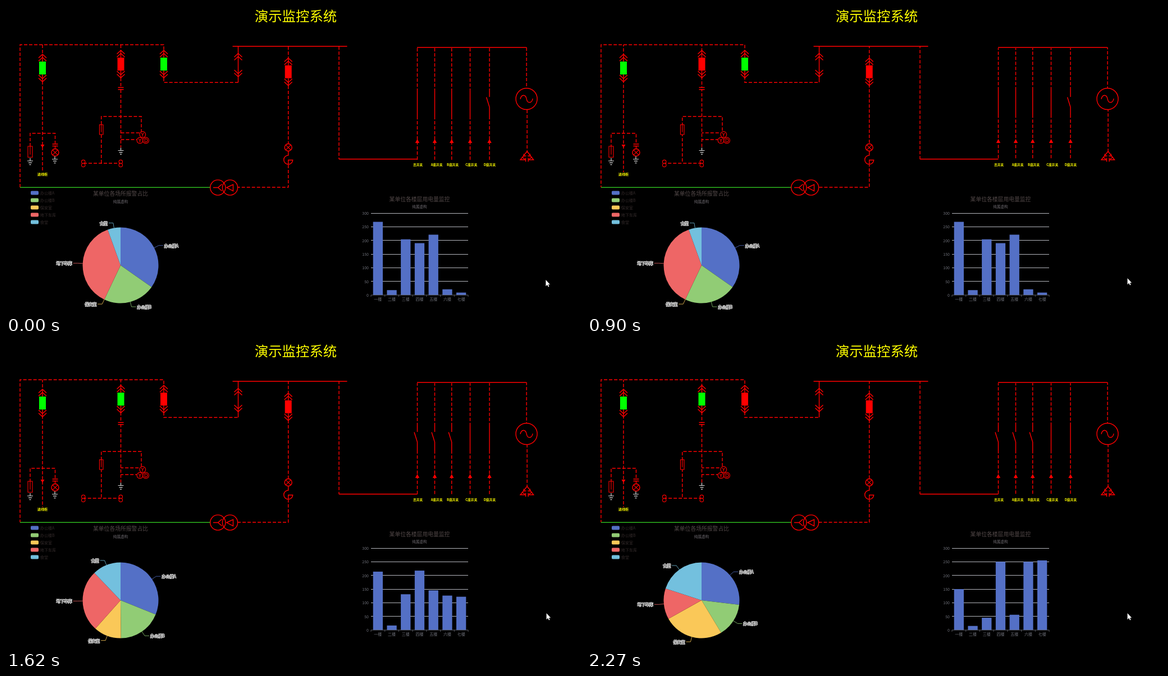
Animation of 1024 by 547 pixels, one loop 2340 ms. Source, as an HTML page:

```html
<!DOCTYPE html>
<html>
<head>
<meta charset="utf-8">
<style>
html, body { margin: 0; width: 100%; height: 100%; overflow: hidden; background: #000; }
svg { display: block; width: 100vw; height: 100vh; }
text { font-family: "Noto Sans CJK SC", "Noto Sans CJK", "Noto Sans", sans-serif; dominant-baseline: central; }
.wire, .flow { fill: none; stroke: #f00; stroke-width: 1.4; }
.flow { stroke-dasharray: 6 3; }
.thin { stroke-width: 1.1; }
.solid { fill: #f00; }
.earth { fill: none; stroke: #ddd; stroke-width: 1.2; }
.mid { text-anchor: middle; }
.end { text-anchor: end; }
.bold { text-anchor: middle; font-weight: 700; }
.tag { font-size: 7px; fill: #333; stroke: #eee; stroke-width: 1.4px; paint-order: stroke; }
</style>
</head>
<body>
<svg id="stage" viewBox="0 0 1024 547"></svg>
<script>
const LOOP = 2340, SWITCH_AT = 1378, EASE_TIME = 500, FLOW_CYCLES = 7, DASH = 9;
const COLORS = ['#5470c6', '#91cc75', '#fac858', '#ee6666', '#73c0de'];
const PLACES = ['办公楼A', '办公楼B', '保安室', '地下车库', '食堂'];
const SLICE_ENDS = [[125, 205.4, 205.4, 340.2, 360], [96.8, 148.9, 240.8, 288.2, 360]];
const BARS = [[268, 18, 204, 190, 221, 21, 9], [150, 15, 45, 250, 56, 250, 255]];
const stage = document.getElementById('stage');

function add(tag, attrs, content) {
  const el = document.createElementNS('http://www.w3.org/2000/svg', tag);
  for (const key in attrs) el.setAttribute(key, attrs[key]);
  if (content !== undefined) el.textContent = content;
  stage.appendChild(el);
  return el;
}
const path = (d, cls = 'wire') => add('path', { d, class: cls });
const flow = d => path(d, 'flow');
const circle = (cx, cy, r, cls = 'wire') => add('circle', { cx, cy, r, class: cls });
const box = (x, y, width, height, fill) => add('rect', { x, y, width, height, fill });
const label = (s, x, y, size, fill, cls = 'mid') =>
  add('text', { x, y, 'font-size': size, fill, class: cls }, s);

function chevrons(x, y, dir) {
  for (const dy of [0, 5.5]) {
    const top = y + dir * dy;
    path(`M${x - 7} ${top + dir * 6.5}L${x} ${top}L${x + 7} ${top + dir * 6.5}`);
  }
}
function breaker(x, y, fill) {
  chevrons(x, y, 1);
  chevrons(x, y + 49, -1);
  path(`M${x} ${y}V${y + 13}M${x} ${y + 36}V${y + 49}`);
  return box(x - 6, y + 13, 12, 23, fill);
}
function earth(x, y) {
  path(`M${x} ${y - 5}V${y}M${x - 5} ${y}h10M${x - 3} ${y + 3.3}h6M${x - 1.5} ${y + 6.6}h3`, 'earth');
}
function lamp(x, y) {
  const d = 4.6;
  circle(x, y, 6.5);
  path(`M${x - d} ${y - d}l${2 * d} ${2 * d}M${x + d} ${y - d}l${-2 * d} ${2 * d}`, 'wire thin');
}
function capacitor(x, y) {
  path(`M${x - 5} ${y}h10M${x - 5} ${y + 3.5}h10`);
}
function resistor(x, y, w, h) {
  path(`M${x - w / 2} ${y}h${w}v${h}h${-w}zM${x} ${y}v${h * 0.75}`, 'wire thin');
}
function star(x, y) {
  path(`M${x - 2.5} ${y - 3}L${x} ${y}L${x + 2.5} ${y - 3}M${x} ${y}v3.5`, 'wire thin');
}

label('演示监控系统', 516, 16.7, 24.4, '#ff0');

// Incoming cabinet
flow('M25 323V69H281V79');
flow('M65 69V86');
flow('M65 134V296');
breaker(65, 86, '#0f0');
flow('M43 250V226.7H87.5V245');
path('M61.5 247h7l-3.5 5.5z', 'solid');
resistor(43, 250, 8, 19.5);
earth(43, 276);
capacitor(87.5, 246);
path('M87.5 249.5V254.5');
lamp(87.5, 261);
earth(87, 273);
label('进线柜', 65, 299, 6.2, '#ff0', 'bold');

// Metering branch
flow('M204.5 69V79');
const breakerB = breaker(204.5, 79, '#f00');
flow('M204.5 128V145');
capacitor(204.5, 145.3);
flow('M204.5 149V252');
earth(204.5, 257.5);
flow('M169.7 211V196.7H241V224');
resistor(169.7, 211.5, 6.5, 17.5);
flow('M169.7 229V280');
flow('M204.5 226H238');
flow('M204.5 238H233');
circle(243.3, 229, 5.4, 'wire thin');
circle(238.5, 239.5, 5.4, 'wire thin');
circle(249, 239.5, 5.4, 'wire thin');
star(243.3, 229);
star(238.5, 239.5);
path('M247.3 236.5v6h1.5a3 3 0 0 0 0-6z', 'wire thin');
flow('M138 280.3H204');
for (const x of [137.7, 204.3]) {
  circle(x, 277.6, 3.2, 'wire thin');
  circle(x, 283.4, 3.2, 'wire thin');
}

// Tie line and main bus
const breakerC = breaker(281, 79, '#0f0');
flow('M281 128V136.3H413.5');
path('M413.5 72V136');
chevrons(413.5, 84.5, 1);
chevrons(413.5, 126, -1);
path('M403.5 71.7H607.5');

// Transformer feeder
flow('M502.7 72V92');
breaker(502.7, 92.7, '#f00');
flow('M502.7 142V245.5');
lamp(502.7, 252);
path('M502.7 258.5V266A8 8 0 1 0 510.7 274.5H502.7V282.5');
flow('M502.7 283V323H413');
circle(377.3, 323.5, 13.6);
circle(399, 323.5, 13.6);
path('M369 323.5H377.5L384.5 317.5M377.5 323.5L384.5 329.5M393 323.5L404.5 318V329.5z');
path('M25 323.2H363.5').style.stroke = '#2db41e';

// Outgoing switches
flow('M593 72V273');
path('M593 272.7H732.5M732 73.8H927');
const switches = ['总', 'A座', 'B座', 'C座', 'D座'].map((name, i) => {
  const x = [732.5, 763.5, 793.7, 826.5, 861][i];
  flow(`M${x} 75V149`);
  flow(`M${x} 196V274`);
  path(`M${x - 3.7} 244h7.4l-3.7-7z`, 'solid');
  label(name + '开关', [733.5, 767, 795.5, 828.7, 861.3][i], 282, 5.7, '#ff0', 'bold');
  return { x, el: path('') };
});

// Generator
flow('M927 74V146');
circle(927, 165.5, 19);
path('M916 166C917.5 157 925.5 157 927 165.5S936.5 174 938 165');
flow('M928 185V259');
path('M928 259L916 274H925.5M930 274H939.5L928 259M925.5 270.5v7M930 270.5v7M922 263.5l.5 4 4-.5M933.5 263.5l-.5 4-4-.5M920 270l4 3M935.5 270l-4 3');

// Pie chart
label('某单位各场所报警占比', 204, 334, 9.8, '#524848');
label('纯属虚构', 204, 348, 6.6, '#6e6a70');
const slices = PLACES.map((name, i) => {
  const y = 333 + i * 13;
  add('rect', { x: 44, y: y - 3.6, width: 14, height: 7.2, rx: 1.8, fill: COLORS[i] });
  label(name, 61, y, 7, '#332a2a', '');
  return {
    area: add('path', { fill: COLORS[i] }),
    lead: add('path', { fill: 'none', stroke: COLORS[i], 'stroke-width': 0.8 }),
    tag: add('text', { class: 'tag' }, name)
  };
});

// Bar chart
const BASE = 515, UNIT = 146 / 300, BAND = 173 / 7;
label('某单位各楼层用电量监控', 736.5, 344, 9.8, '#524848');
label('纯属虚构', 736.5, 357, 6.6, '#6e6a70');
for (let v = 0; v <= 300; v += 50) {
  const y = BASE - v * UNIT;
  label(v, 646, y, 7, '#6e7079', 'end');
  if (v) add('path', { d: `M650 ${Math.floor(y) + 0.5}H823`, stroke: '#b4b6bc' });
}
let axis = `M650 ${BASE}H823`;
for (let i = 0; i <= 7; i++) axis += `M${650 + i * BAND} ${BASE}v3`;
const bars = [...'一二三四五六七'].map((n, i) => {
  label(n + '楼', 650 + (i + 0.5) * BAND, 522.3, 7, '#6e7079');
  return box(650 + i * BAND + 3.7, 0, 17.3, 0, '#5470c6');
});
add('path', { d: axis, stroke: '#6e7079', 'stroke-width': 0.8 });

const cursor = add('path', {
  d: 'M0 0V11.2L2.6 8.8L4.4 12.6L6 11.8L4.3 8.2H7.6z', fill: '#fff'
});
const flows = document.querySelectorAll('.flow');

const cubicInOut = p => p < 0.5 ? 4 * p ** 3 : 1 - 4 * (1 - p) ** 3;
const mix = (pair, i, k) => pair[0][i] + (pair[1][i] - pair[0][i]) * k;
function polar(angle, r) {
  const a = angle * Math.PI / 180;
  return [204 + r * Math.sin(a), 462 - r * Math.cos(a)];
}

function drawPie(k) {
  let from = 0;
  slices.forEach(({ area, lead, tag }, i) => {
    const to = mix(SLICE_ENDS, i, k), mid = (from + to) / 2;
    area.setAttribute('d', `M204 462L${polar(from, 67.5)}A67.5 67.5 0 0 1 ${polar(to, 67.5)}z`);
    const [x, y] = polar(mid, 76.5), side = mid < 180 ? 1 : -1;
    lead.setAttribute('d', `M${polar(mid, 67.5)}L${x} ${y}h${side * 8}`);
    tag.setAttribute('x', x + side * 10);
    tag.setAttribute('y', y);
    tag.setAttribute('text-anchor', side > 0 ? 'start' : 'end');
    from = to;
  });
}

function render(t) {
  const switched = t >= SWITCH_AT;
  const k = cubicInOut(Math.min(1, Math.max(0, (t - SWITCH_AT) / EASE_TIME)));
  flows.forEach(f => { f.style.strokeDashoffset = -DASH * FLOW_CYCLES * t / LOOP; });
  breakerB.setAttribute('fill', switched ? '#0f0' : '#f00');
  breakerC.setAttribute('fill', switched ? '#f00' : '#0f0');
  switches.forEach(({ x, el }, i) => {
    const open = switched ? i < 3 : i === 4;
    el.setAttribute('d', open ? `M${x} 149V162M${x - 5.5} 162.5L${x} 180V196` : `M${x} 149V196`);
  });
  drawPie(k);
  bars.forEach((bar, i) => {
    const h = mix(BARS, i, k) * UNIT;
    bar.setAttribute('y', BASE - h);
    bar.setAttribute('height', h);
  });
  cursor.setAttribute('transform', t < 70 ? 'translate(961.3 488)' : 'translate(962.5 485)');
}

const start = performance.now();
function tick() {
  render((performance.now() - start) % LOOP);
  requestAnimationFrame(tick);
}
tick();
</script>
</body>
</html>
```
